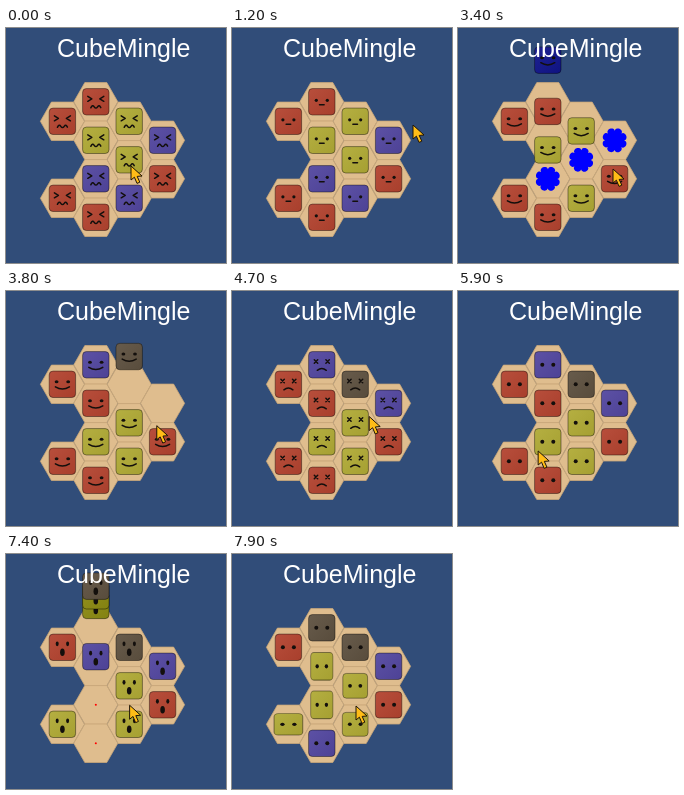
Animation, 220 px wide and 235 px high, one loop 8000 ms. Source, as an HTML page:

```html
<!DOCTYPE html>
<html lang="en">
<head>
<meta charset="utf-8">
<title>CubeMingle</title>
<style>
html, body { margin: 0; width: 100%; height: 100%; overflow: hidden; background: #314d79; }
svg { display: block; width: 220px; height: 235px; }
text { font: 25px "Liberation Sans", Arial, sans-serif; fill: #fff; }
.line { fill: none; stroke: #130f0c; stroke-width: 1.5; stroke-linecap: round; stroke-linejoin: round; }
</style>
</head>
<body>
<svg viewBox="0 0 220 235">
  <defs>
    <linearGradient id="shine" x1="0" y1="0" x2="1" y2="1">
      <stop offset="0" stop-color="#fff" stop-opacity=".06"/>
      <stop offset="1" stop-color="#000" stop-opacity=".06"/>
    </linearGradient>
    <g id="squint" class="line"><path d="M-8-5.5l4 2.5-4 2.5M8-5.5l-4 2.5 4 2.5M-5 6q1.7-3.5 3.4-1t3.4 0 3.2.8"/></g>
    <g id="blank"><circle cx="-5.5" r="2"/><circle cx="5.5" r="2"/></g>
    <g id="smirk"><circle cx="-5.5" cy="-1.5" r="1.6"/><circle cx="5.5" cy="-1.5" r="1.6"/><path class="line" d="M-2.3 3h4.6"/></g>
    <g id="gasp"><circle cx="-5" cy="-3" r="1.6"/><circle cx="5" cy="-3" r="1.6"/><ellipse cy="4.5" rx="1.8" ry="2.8"/></g>
    <g id="smile"><ellipse cx="-5.8" cy="-2.5" rx="1.9" ry="1.5"/><ellipse cx="5.8" cy="-2.5" rx="1.9" ry="1.5"/><path class="line" d="M-7 2.5q7 4.5 14 0"/></g>
    <g id="frown" class="line"><path d="M-7.5-5l3.4 3.4m0-3.4l-3.4 3.4M4.1-5l3.4 3.4m0-3.4l-3.4 3.4M-4.5 5.5q4.5-3.5 9 0"/></g>
    <g id="shout"><ellipse cx="-5.2" cy="-3.5" rx="1.5" ry="2.4"/><ellipse cx="5.2" cy="-3.5" rx="1.5" ry="2.4"/><ellipse cy="5" rx="2.3" ry="3.8"/></g>
  </defs>
  <rect width="220" height="235" fill="#314d79"/>
  <g id="board"></g>
  <g id="splats"></g>
  <g id="tiles"></g>
  <text x="51" y="28.5">CubeMingle</text>
  <path id="cursor" d="M0 0L0 14L3.4 11.2L6 17.4L8.8 16.2L6.2 10.4L11 10Z" fill="#ffbc17" stroke="#1d1408" stroke-linejoin="round"/>
</svg>
<script>
const LOOP = 8000, STEP = 100;
const COLORS = { R: "#b3432f", Y: "#b0aa35", P: "#52469f", B: "#5e5140" };
const FRESH = { Y: "#8c8a12", P: "#10148a", B: "#5e5140" };
const BURST = { R: "#f00", P: "#00f", Y: "#ff0" };
const TOPS = [93.3, 73.8, 93.3, 112.3];
const DROP = 55.5, SHRINK = 400;
const spot = (c, r) => [56.4 + 33.4 * c, TOPS[c] + 38.5 * r];
const byId = id => document.getElementById(id);
const clamp = v => Math.max(0, Math.min(1, v));
const smooth = v => v * v * (3 - 2 * v);
const part = (t, a, b) => clamp((t - a) / (b - a));

function add(parent, tag, attrs) {
  const el = document.createElementNS("http://www.w3.org/2000/svg", tag);
  for (const k in attrs) el.setAttribute(k, attrs[k]);
  return parent.appendChild(el);
}

// A move is: start, end, target column, target row.
const SWAP1 = [1750, 2030], SWAP2 = [6200, 6500];
const FALL1 = [3300, 3700], FALL2 = [7300, 7700];
const POP1 = { at: 2030, clear: 3500 };
const POP2 = { at: 6600, clear: 7350 };
const POP3 = { at: 7800, clear: 9000 };

const tiles = [
  { k: "R", at: [0, 0] },
  { k: "R", at: [0, 2], moves: [[...SWAP2, 1, 2]], pop: POP2, phase: 5.2 },
  { k: "R", at: [1, 0], moves: [[...FALL1, 1, 1]], pop: POP2, phase: 5.2 },
  { k: "Y", at: [1, 1], moves: [[...FALL1, 1, 2], [...SWAP2, 0, 2]], pop: POP3, phase: 5.8 },
  { k: "P", at: [1, 2], pop: POP1, phase: -.2 },
  { k: "R", at: [1, 3], pop: POP2, phase: 5.2 },
  { k: "Y", at: [2, 0], moves: [[...FALL1, 2, 1]], pop: POP3, phase: 5.4 },
  { k: "P", at: [2, 2], moves: [[...SWAP1, 2, 1]], pop: POP1, phase: 1.12 },
  { k: "Y", at: [2, 1], moves: [[...SWAP1, 2, 2]], pop: POP3, phase: 5.5 },
  { k: "P", at: [3, 0], pop: POP1, phase: -.7 },
  { k: "R", at: [3, 1] },
  { k: "P", at: [1, 0], isNew: true, moves: [[...FALL1, 1, 0], [...FALL2, 1, 3]] },
  { k: "B", at: [2, 0], isNew: true, moves: [[3600, 4000, 2, 0]] },
  { k: "P", at: [3, 0], isNew: true, moves: [[3900, 4300, 3, 0]] },
  { k: "Y", at: [1, 0], isNew: true, moves: [[...FALL2, 1, 2]], pop: POP3, phase: 5.1 },
  { k: "Y", at: [1, 0], isNew: true, moves: [[...FALL2, 1, 1]], pop: POP3, phase: 5.1 },
  { k: "B", at: [1, 0], isNew: true, moves: [[...FALL2, 1, 0]] }
];

const FACES = [[0, "squint"], [100, "blank"], [200, "smirk"], [1900, "gasp"], [2800, "smile"],
  [4000, "blank"], [4700, "frown"], [5300, "blank"], [6200, "shout"], [7500, "blank"]];

const PATH = [[0, 125, 138], [300, 125, 138], [550, 130, 174], [700, 136, 123], [800, 136, 123],
  [1200, 181, 97], [1500, 186, 100], [1700, 170, 108], [1900, 126, 138], [2300, 118, 219], [2600, 124, 216],
  [3400, 155, 141], [4400, 143, 123], [4500, 145, 121], [4600, 145, 121], [5000, 95, 150],
  [5500, 62, 171], [5600, 62, 171], [6100, 90, 154], [6700, 123, 150], [7900, 124, 152], [8000, 124, 152]];

// Eight round lobes.
function blob() {
  let d = "";
  for (let i = 0; i < 96; i++) {
    const a = i * Math.PI / 48;
    const r = 9.6 + 2.9 * Math.sqrt(Math.abs(Math.sin(4 * a)));
    d += (i ? "L" : "M") + (r * Math.cos(a)).toFixed(2) + " " + (r * Math.sin(a)).toFixed(2);
  }
  return d + "Z";
}

function build() {
  [[0, 2], [0, 1, 2, 3], [0, 1, 2], [0, 1]].forEach((rows, c) => rows.forEach(r => {
    add(byId("board"), "path", {
      d: "M-22 0L-11-19.2H11L22 0L11 19.2H-11Z", transform: `translate(${spot(c, r)})`,
      fill: "#dfbd8e", stroke: "#c9a779", "stroke-width": .8
    });
  }));
  const shape = blob();
  for (const tile of tiles) {
    const g = tile.el = add(byId("tiles"), "g", {});
    const box = { x: -13.2, y: -13.2, width: 26.4, height: 26.4, rx: 3.8 };
    tile.body = add(g, "rect", { ...box, fill: COLORS[tile.k], stroke: "#000", "stroke-opacity": .42 });
    add(g, "rect", { ...box, fill: "url(#shine)" });
    tile.face = add(g, "use", { fill: "#130f0c" });
    if (tile.pop) tile.splat = add(byId("splats"), "path", { d: shape, fill: BURST[tile.k] });
  }
}

function place(tile, t) {
  let [x, y] = spot(...tile.at);
  if (tile.isNew) y -= DROP;
  for (const [a, b, c, r] of tile.moves || []) {
    const p = part(t, a, b), [tx, ty] = spot(c, r);
    x += (tx - x) * p;
    y += (ty - y) * p;
  }
  return [x, y];
}

function drawTile(tile, t, face) {
  const pos = place(tile, t);
  let w = 1, h = 1, shown = true;
  if (tile.isNew) {
    const [start, end] = tile.moves[0];
    shown = t > start;
    tile.body.setAttribute("fill", (t < end ? FRESH : COLORS)[tile.k]);
  }
  if (tile.pop) {
    const { at, clear } = tile.pop;
    const k = part(t, at, at + SHRINK);
    const squash = .5 * Math.min(1, 3 * k) * Math.sin(tile.phase + 12 * (k - .7));
    w = (1 - k * k) * Math.exp(squash);
    h = (1 - k * k) * Math.exp(-squash);
    shown = shown && k < 1;
    const grow = part(t, at + SHRINK - 50, at + SHRINK + 100) - part(t, clear - 60, clear + 60);
    tile.splat.setAttribute("transform", `translate(${pos}) scale(${grow}) rotate(${(t - at) / 30})`);
  }
  tile.el.setAttribute("visibility", shown ? "visible" : "hidden");
  tile.el.setAttribute("transform", `translate(${pos}) scale(${w} ${h})`);
  tile.face.setAttribute("href", "#" + face);
}

function draw(t) {
  const face = FACES.filter(f => f[0] <= t).pop()[1];
  tiles.forEach(tile => drawTile(tile, t, face));
  const i = PATH.findIndex(p => p[0] > t);
  const [a, x, y] = PATH[i - 1], [b, tx, ty] = PATH[i];
  const p = smooth(part(t, a, b));
  byId("cursor").setAttribute("transform", `translate(${x + (tx - x) * p} ${y + (ty - y) * p})`);
}

function tick() {
  draw(Math.floor(performance.now() % LOOP / STEP) * STEP);
  requestAnimationFrame(tick);
}

build();
tick();
</script>
</body>
</html>
```
